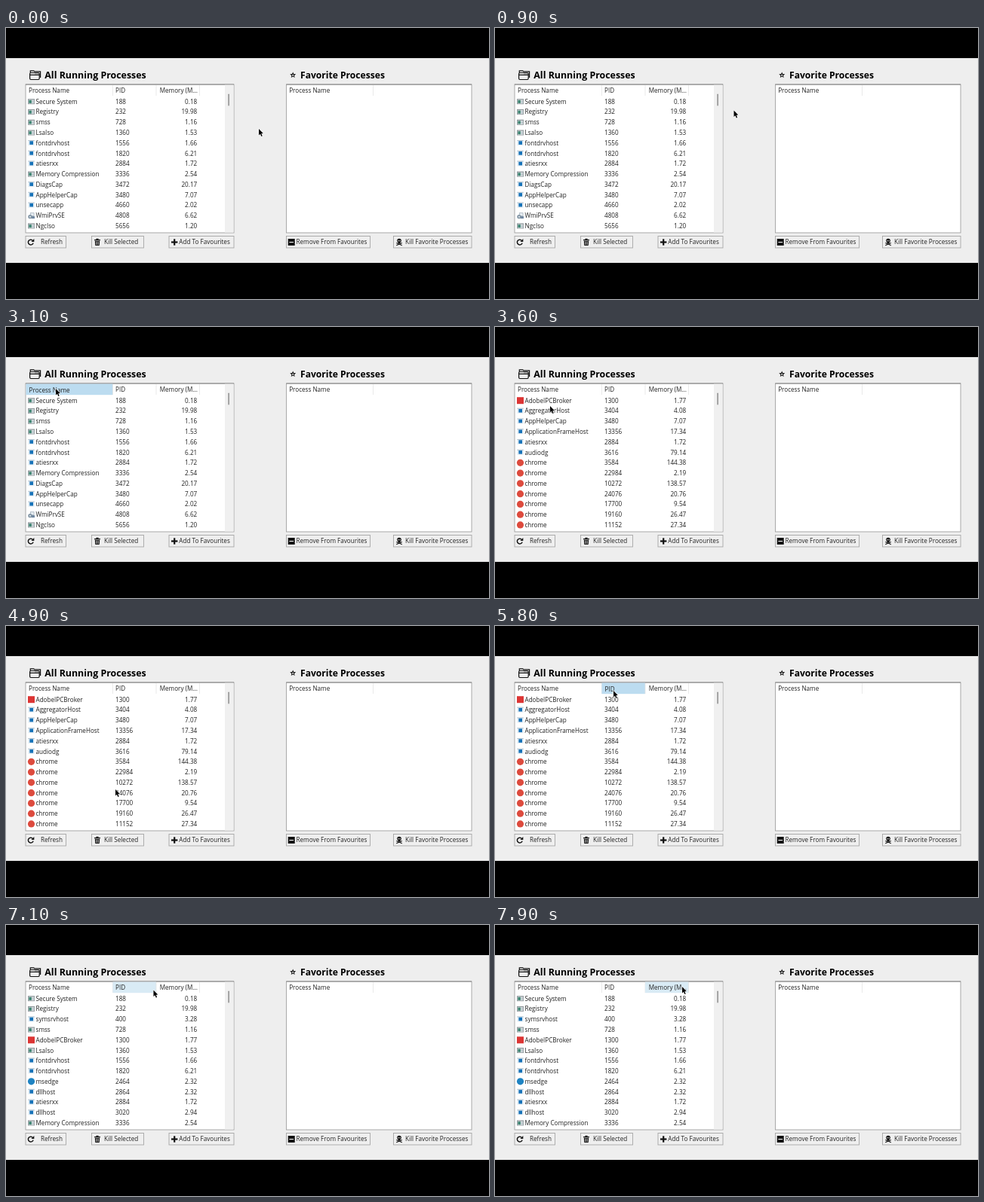
Write an HTML page with a canvas that moves like this. It is 640 px wide and 360 px high and loops after 8000 ms.

```html
<!DOCTYPE html>
<html lang="en">
<head>
<meta charset="utf-8">
<title>Process manager</title>
<style>
html, body { margin: 0; width: 100%; height: 100%; overflow: hidden; background: #000; }
canvas { display: block; width: 640px; height: 360px; }
</style>
</head>
<body>
<canvas id="stage"></canvas>
<script>
const canvas = document.getElementById('stage');
const ctx = canvas.getContext('2d');
const dpr = window.devicePixelRatio || 1;
canvas.width = 640 * dpr;
canvas.height = 360 * dpr;

const LOOP = 8000, STEP = 100;
const FONT = '"Open Sans", "Noto Sans", sans-serif';
const INK = '#222', FACE = '#eeeeee';

// kind|name|pid|memory
const parse = s => s.trim().split('\n').map(r => r.trim().split('|'));
const byStart = parse(`
  s|Secure System|188|0.18
  s|Registry|232|19.98
  s|smss|728|1.16
  s|LsaIso|1360|1.53
  a|fontdrvhost|1556|1.66
  a|fontdrvhost|1820|6.21
  a|atiesrxx|2884|1.72
  s|Memory Compression|3336|2.54
  a|DiagsCap|3472|20.17
  a|AppHelperCap|3480|7.07
  a|unsecapp|4660|2.02
  w|WmiPrvSE|4808|6.62
  s|NgcIso|5656|1.20`);
const byName = parse(`
  r|AdobeIPCBroker|1300|1.77
  a|AggregatorHost|3404|4.08
  a|AppHelperCap|3480|7.07
  a|ApplicationFrameHost|13356|17.34
  a|atiesrxx|2884|1.72
  a|audiodg|3616|79.14
  c|chrome|3584|144.38
  c|chrome|22984|2.19
  c|chrome|10272|138.57
  c|chrome|24076|20.76
  c|chrome|17700|9.54
  c|chrome|19160|26.47
  c|chrome|11152|27.34`);
const byPid = parse(`
  s|Secure System|188|0.18
  s|Registry|232|19.98
  a|symsrvhost|400|3.28
  s|smss|728|1.16
  r|AdobeIPCBroker|1300|1.77
  s|LsaIso|1360|1.53
  a|fontdrvhost|1556|1.66
  a|fontdrvhost|1820|6.21
  e|msedge|2464|2.32
  a|dllhost|2864|2.32
  a|atiesrxx|2884|1.72
  a|dllhost|3020|2.94
  s|Memory Compression|3336|2.54`);

const columns = [
  { x: 26.5, end: 141.5, label: 'Process Name', tx: 30 },
  { x: 141.5, end: 199, label: 'PID', tx: 145 },
  { x: 199, end: 256.5, label: 'Memory (M...', tx: 203.7 }
];

// time, x, y of the pointer tip
const path = [
  [0, 335, 134], [400, 333, 131], [1400, 300, 88], [1700, 298, 85],
  [2600, 66, 83], [3000, 66, 82], [3200, 66, 82], [3600, 73, 105],
  [4900, 145, 217], [5500, 157, 86], [5900, 157, 86], [6400, 158, 90],
  [6700, 160, 89], [7600, 245, 83], [7900, 248, 82]
];

function pointer(t) {
  let i = 0;
  while (i < path.length - 2 && t >= path[i + 1][0]) i++;
  const [t0, x0, y0] = path[i], [t1, x1, y1] = path[i + 1];
  const u = Math.min(1, (t - t0) / (t1 - t0)), k = u * u * (3 - 2 * u);
  return { x: x0 + (x1 - x0) * k, y: y0 + (y1 - y0) * k };
}

function rect(x, y, w, h, fill) {
  ctx.fillStyle = fill;
  ctx.fillRect(x, y, w, h);
}

function frame(x, y, w, h, color, width = 1) {
  ctx.strokeStyle = color;
  ctx.lineWidth = width;
  ctx.strokeRect(x, y, w, h);
}

function disc(x, y, r, fill) {
  ctx.fillStyle = fill;
  ctx.beginPath();
  ctx.arc(x, y, r, 0, Math.PI * 2);
  ctx.fill();
}

function poly(points, fill) {
  ctx.beginPath();
  points.forEach(([x, y]) => ctx.lineTo(x, y));
  ctx.closePath();
  if (fill) {
    ctx.fillStyle = fill;
    ctx.fill();
  }
}

function line(x0, y0, x1, y1, color, width = 1) {
  ctx.strokeStyle = color;
  ctx.lineWidth = width;
  ctx.beginPath();
  ctx.moveTo(x0, y0);
  ctx.lineTo(x1, y1);
  ctx.stroke();
}

function text(s, x, y, { size = 8.15, weight = 400, align = 'left', color = INK } = {}) {
  ctx.font = `${weight} ${size}px ${FONT}`;
  ctx.textAlign = align;
  ctx.fillStyle = color;
  ctx.fillText(s, x, y);
}

const rowIcons = {
  s(y) {
    rect(29, y - 3.5, 9, 7, '#8b9398');
    rect(29.8, y - 2.3, 7.4, 5, '#e6ecec');
    rect(30.3, y - 1.8, 3.6, 4, '#3f8573');
    rect(34.6, y - 1.5, 2, 3.5, '#b6c3ca');
  },
  a(y) {
    rect(29.3, y - 3.8, 8.5, 7, '#e3edf4');
    rect(29.3, y - 3.8, 8.5, 1, '#b3c3cf');
    rect(31.4, y - 2.5, 4.6, 4.6, '#1672b8');
  },
  w(y) {
    rect(32, y - 4, 5.5, 7.5, '#b4bfc8');
    rect(33, y - 3, 3.5, 3, '#e9eff3');
    disc(32, y + 1.5, 2.7, '#8295a5');
    disc(32, y + 1.5, 1, '#e4e9ee');
    rect(34, y + 1, 4, 3, '#7087a0');
  },
  r(y) { rect(29, y - 4.5, 9, 9, '#dc3534'); },
  c(y) { disc(33.5, y, 4.6, '#dd4b3e'); },
  e(y) { disc(33.5, y, 4.6, '#1e83c2'); }
};

function windowIcon() {
  ctx.strokeStyle = '#111';
  ctx.lineWidth = 1.2;
  ctx.beginPath();
  ctx.roundRect(31.6, 59.5, 12.6, 9, 1.4);
  ctx.moveTo(31.6, 62.3);
  ctx.lineTo(44.2, 62.3);
  ctx.moveTo(32.3, 59.3);
  ctx.lineTo(32.3, 56.8);
  ctx.lineTo(36.8, 56.8);
  ctx.lineTo(37.8, 57.8);
  ctx.lineTo(45.6, 57.8);
  ctx.lineTo(45.6, 66);
  ctx.stroke();
  [39, 41, 43].forEach(x => rect(x - .4, 60.5, .9, .9, '#111'));
}

function starIcon(cx, cy, r) {
  const points = Array.from({ length: 10 }, (_, i) => {
    const a = -Math.PI / 2 + i * Math.PI / 5, d = i % 2 ? r * .45 : r;
    return [cx + d * Math.cos(a), cy + d * Math.sin(a)];
  });
  poly(points, '#1a1a1a');
  disc(cx, cy + .2, 1.1, '#ddd');
}

function refreshIcon() {
  ctx.strokeStyle = '#111';
  ctx.lineWidth = 1.5;
  ctx.beginPath();
  ctx.arc(32.8, 284.6, 3.4, .3, Math.PI * 1.75);
  ctx.stroke();
  poly([[37.3, 280], [37.3, 284], [33.4, 284]], '#111');
}

function trashIcon() {
  rect(117, 281, 8, 1.2, '#111');
  rect(119.4, 279.8, 3.2, 1.2, '#111');
  poly([[117.8, 282.7], [124.2, 282.7], [123.7, 289], [118.3, 289]], '#111');
  [119.6, 121, 122.4].forEach(x => line(x, 283.6, x, 288, FACE, .6));
}

function plusIcon() {
  rect(219, 283.4, 8.4, 2.2, '#111');
  rect(222.1, 280.3, 2.2, 8.4, '#111');
}

function minusIcon() {
  rect(373.7, 280, 9, 9, '#111');
  rect(375.4, 284, 5.6, 1.1, '#fff');
}

function skullIcon() {
  line(517.2, 285.6, 524.8, 288.8, '#111', 1.1);
  line(524.8, 285.6, 517.2, 288.8, '#111', 1.1);
  disc(521, 282.5, 2.8, '#111');
  rect(519.6, 284, 2.8, 2, '#111');
  disc(519.9, 282.8, .7, FACE);
  disc(522.1, 282.8, .7, FACE);
}

const buttons = [
  { x: 26, w: 53.5, label: 'Refresh', tx: 46, icon: refreshIcon },
  { x: 113.5, w: 69, label: 'Kill Selected', tx: 130, icon: trashIcon },
  { x: 216, w: 86, label: 'Add To Favourites', tx: 229.3, icon: plusIcon },
  { x: 371.5, w: 111, label: 'Remove From Favourites', tx: 384.5, icon: minusIcon },
  { x: 513.5, w: 103.5, label: 'Kill Favorite Processes', tx: 529, icon: skullIcon }
];

function listBox(x, w) {
  rect(x, 75, w, 197, '#fff');
  frame(x, 75, w, 197, '#a0a0a0', .9);
  line(x, 75, x + w, 75, '#7d7d7d', .9);
}

function scrollbar(wide) {
  rect(290, 75.6, 11.5, 196, '#f0f0f0');
  ctx.fillStyle = '#868686';
  ctx.beginPath();
  if (wide) ctx.roundRect(293, 87.3, 4.2, 16.5, 2);
  else ctx.roundRect(294.4, 87.5, 1.4, 16, .7);
  ctx.fill();
  if (wide) {
    poly([[292.3, 83.4], [295.1, 79.2], [297.9, 83.4]], '#868686');
    poly([[292.3, 263], [295.1, 267.2], [297.9, 263]], '#868686');
  }
}

function cursor({ x, y }) {
  ctx.save();
  ctx.translate(x, y);
  poly([[0, 0], [0, 8.4], [1.9, 6.7], [3.3, 10], [4.7, 9.4], [3.3, 6.2], [5.8, 6]]);
  ctx.lineJoin = 'round';
  ctx.lineWidth = 1.1;
  ctx.strokeStyle = '#fff';
  ctx.stroke();
  ctx.fillStyle = '#000';
  ctx.fill();
  ctx.restore();
}

function draw(t) {
  const tip = pointer(t);
  const pressed = (t >= 3000 && t < 3200) || (t >= 5800 && t < 5900);
  const rows = t < 3200 ? byStart : t < 5900 ? byName : byPid;

  ctx.setTransform(dpr, 0, 0, dpr, 0, 0);
  rect(0, 0, 640, 360, '#000');
  rect(0, 40, 640, 272, FACE);

  windowIcon();
  text('All Running Processes', 51.3, 66.5, { size: 12.4, weight: 700, color: '#000' });
  starIcon(380.2, 62.6, 4.2);
  text('Favorite Processes', 390, 66.5, { size: 12.1, weight: 700, color: '#000' });

  listBox(26, 276);
  listBox(371.5, 245.5);
  scrollbar(t >= 1400 && t < 2500);

  for (const c of columns) {
    const over = tip.y > 75 && tip.y < 91 && tip.x >= c.x && tip.x < c.end;
    if (over) rect(c.x, 75.5, c.end - c.x, 14.7, pressed ? '#bcdcf0' : '#d9ebf5');
    line(c.end, 76, c.end, 90, '#e4e4e4', .8);
    text(c.label, c.tx + (over && pressed ? .6 : 0), 86.2 + (over && pressed ? .5 : 0));
  }
  text('Process Name', 375.2, 86.2);
  line(486.5, 76, 486.5, 90, '#e4e4e4', .8);

  rows.forEach(([kind, name, pid, memory], i) => {
    const y = 97.7 + i * 13.77;
    rowIcons[kind](y);
    text(name, 39.5, y + 3);
    text(pid, 145, y + 3);
    text(memory, 253.2, y + 3, { align: 'right' });
  });

  for (const b of buttons) {
    rect(b.x, 276.5, b.w, 15.5, '#efefef');
    frame(b.x, 276.5, b.w, 15.5, '#a6a6a6', .9);
    b.icon();
    text(b.label, b.tx, 287.3);
  }

  cursor(tip);
}

const start = performance.now();
function tick() {
  const t = (performance.now() - start) % LOOP;
  draw(Math.floor(t / STEP) * STEP);
  requestAnimationFrame(tick);
}
tick();
</script>
</body>
</html>
```
